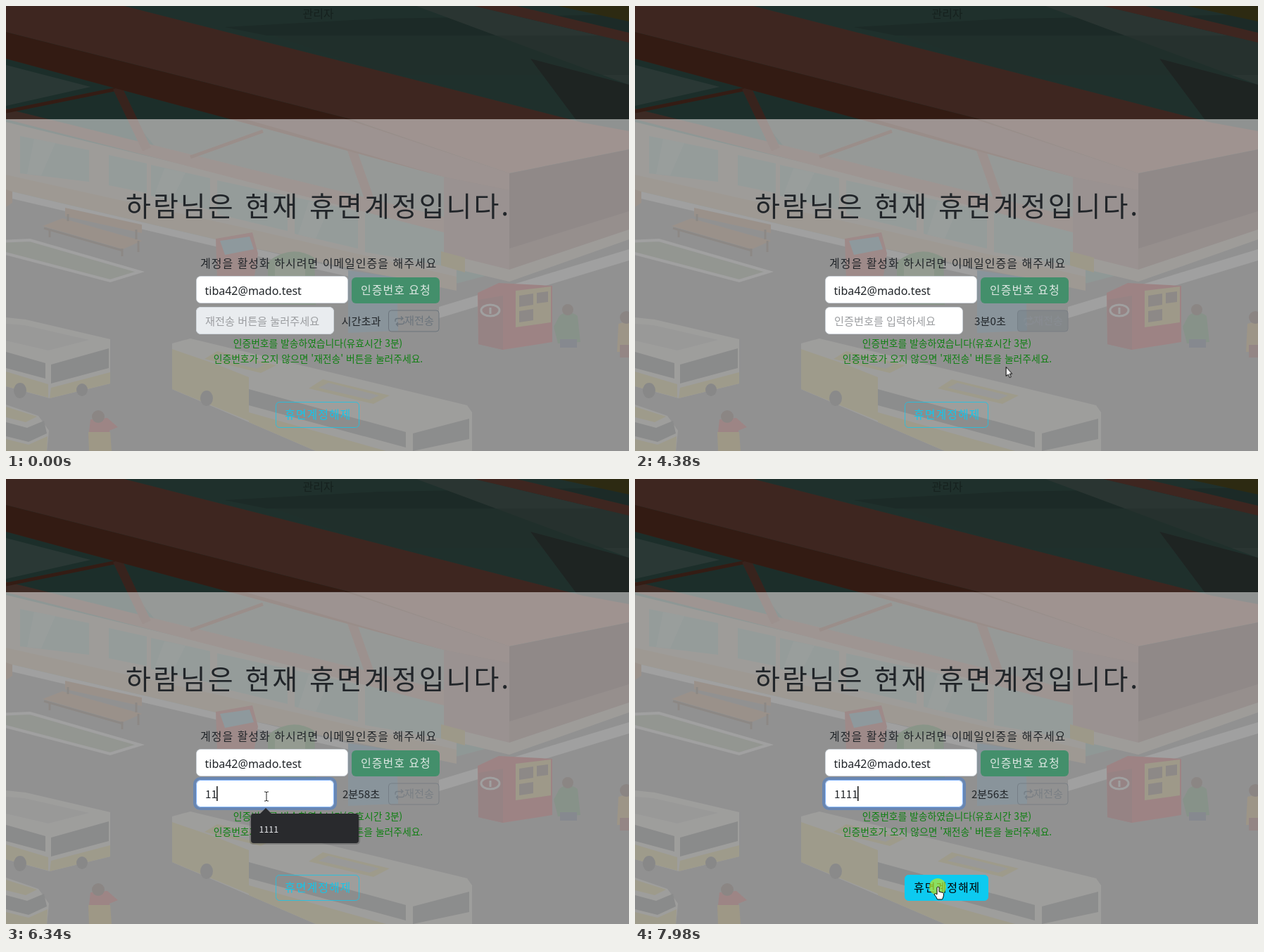
Animation of 885 by 633 pixels, one loop 8 s. Source, as an HTML page:

```html
<!DOCTYPE html>
<html lang="ko">
<head>
<meta charset="utf-8">
<title>휴면계정 해제</title>
<style>
html, body { margin: 0; width: 100%; height: 100%; overflow: hidden; background: #232323; }
svg { display: block; width: 885px; height: 633px; }
text { font-family: "Noto Sans CJK KR", "Noto Sans CJK", "Noto Sans", sans-serif; font-size: 16px; fill: #212529; }
.spaced { letter-spacing: 1px; }
.title { font-size: 39px; font-weight: 300; letter-spacing: 3px; }
.field, .small { font-size: 15.2px; }
.hint { fill: #9b9da0; }
.note { font-size: 13.8px; fill: #0f7f12; }
.mid { text-anchor: middle; }
.email { font-family: "Noto Sans", sans-serif; }
.menu text { font-size: 12.4px; fill: #e8eaed; }

.pointer, .ring, .menu, .resend, .resend-fill, .resend-ink, .release, .release-ink {
  animation: 8s linear infinite;
}
.pointer { animation-name: travel; }
.ring { animation-name: focus; }
.menu { animation-name: menu; }
.resend { animation-name: disable; }
.resend-fill { animation-name: resend-fill; }
.resend-ink { animation-name: resend-ink; }
.release { animation-name: release; }
.release-ink { animation-name: release-ink; }

@keyframes travel {
  0%, 9% { transform: translate(751px, 617px); }
  11.5% { transform: translate(688px, 572px); }
  13.75% { transform: translate(632px, 516px); }
  15.875% { transform: translate(603px, 481px); }
  18.5% { transform: translate(578px, 451px); }
  19.4%, 51.375% { transform: translate(577px, 445px); }
  53% { transform: translate(548px, 490px); }
  54.75% { transform: translate(527px, 513px); }
  56.25% { transform: translate(480px, 500px); }
  58% { transform: translate(400px, 462px); }
  60%, 87.875% { transform: translate(370px, 451px); }
  90% { transform: translate(385px, 510px); }
  92.5% { transform: translate(418px, 562px); }
  94.75%, 100% { transform: translate(430px, 580px); }
}
@keyframes focus { 0%, 64.5% { opacity: 0; } 66.5%, 100% { opacity: 1; } }
@keyframes menu { 0%, 65% { opacity: 0; } 67.5%, 83.4% { opacity: 1; } 84.25% { opacity: .8; } 87%, 100% { opacity: 0; } }
@keyframes disable { 0%, 53% { opacity: 1; } 53.01%, 100% { opacity: .65; } }
@keyframes resend-fill { 0%, 19.3% { fill-opacity: 0; } 21.1%, 53.8% { fill-opacity: 1; } 55.7%, 100% { fill-opacity: 0; } }
@keyframes resend-ink { 0%, 19.3% { color: #6c757d; } 21.1%, 53.8% { color: #fff; } 54.7% { color: #868c94; } 55.7%, 100% { color: #6c757d; } }
@keyframes release { 0%, 92.8% { fill-opacity: 0; stroke-opacity: .75; } 94.75%, 100% { fill-opacity: 1; stroke-opacity: 1; } }
@keyframes release-ink { 0%, 92.8% { fill: #14c6eb; } 94.75%, 100% { fill: #000; } }
</style>
</head>
<body>
<svg viewBox="0 0 885 633">
  <!-- bus terminal -->
  <rect width="885" height="633" fill="#8c8c8c"/>
  <path fill="#7cc0b0" d="M0 0H885V330L620 400L0 270Z"/>
  <path fill="#70a89a" d="M310 30L530 18L885 12V42H370Z"/>
  <path fill="#a8d4c8" d="M583 0H665L885 52V112Z"/>
  <path fill="#86b8a8" d="M540 98H885V42H380Z" opacity=".5"/>
  <path fill="#788f88" d="M745 75L885 112V180L812 165Z"/>
  <path fill="#f89880" d="M665 0H725L885 38V52Z"/>
  <path fill="#b4a848" d="M784 0H885V22Z"/>

  <path fill="#f0e4cc" d="M0 150L640 300V400L0 262Z"/>
  <path fill="#a8e0d4" d="M20 185L118 205V250L20 238ZM146 212L200 224V266L146 255ZM206 226L290 245V290L206 270ZM300 248L400 270V320L300 296ZM410 272L500 292V345L410 324ZM510 292L622 315V370L510 350Z"/>
  <path fill="#c8f0e4" d="M40 189L70 195L50 241L30 239ZM225 231L255 237L235 277L210 271ZM430 278L460 284L440 331L415 325Z"/>
  <path fill="#f0cc98" d="M0 240L350 318L640 385V405L340 342L0 262Z"/>
  <path fill="#fff" d="M0 262L340 342L600 402V410L340 352L0 272Z"/>
  <path fill="#70b8a8" d="M0 75L290 150L622 235V315L0 165Z"/>
  <path fill="#a8e0d4" d="M0 84L120 115L0 142Z"/>
  <path fill="#b4ccbc" d="M180 161H332L622 237V300L215 204Z"/>
  <path fill="#f0a890" d="M0 146L622 300V322L0 161Z"/>
  <path fill="none" stroke="#d07050" stroke-width="5" d="M0 150L158 118M262 215L365 178"/>
  <path fill="none" stroke="#e08c74" stroke-width="13" d="M158 116L200 204M488 195L516 274"/>
  <path fill="#f89880" d="M0 0H168L820 166L885 178V204L715 238L490 161L0 37Z"/>
  <path fill="#cc6c4c" d="M0 37L490 161L715 238V264L622 243L0 75Z"/>
  <path fill="#e89c8c" d="M480 160L715 238V262L622 243L400 178L340 161Z"/>
  <path fill="#d09488" d="M622 243L715 262V392L622 368Z"/>
  <path fill="#804c44" d="M715 238L885 204V325L715 384Z"/>
  <path fill="#b0786c" d="M715 345L885 292V325L715 384Z"/>
  <path fill="#f0e4cc" d="M622 352L715 375L885 318V332L715 392L622 370Z"/>
  <path fill="#fff" d="M885 346V362L615 444V428Z"/>

  <!-- planter, bench -->
  <path fill="#9cb08c" stroke="#fff" stroke-width="4" d="M-8 335L34 333L190 378L148 391L-8 350Z"/>
  <path fill="#d08c50" d="M84 287L193 311V323L84 299ZM52 313L80 302L193 334L166 346Z"/>
  <path fill="none" stroke="#604028" stroke-width="3" d="M62 317V329M165 345V356M188 334V350M88 296V306M185 318V332M54 316L166 348"/>
  <path fill="#d08c50" d="M0 261L9 264V280L0 286Z"/>

  <!-- kiosks -->
  <path fill="#f05048" d="M298 331L350 322L358 352L352 390H300Z"/>
  <path fill="#70c8e8" d="M304 334L346 328L352 346L311 354Z"/>
  <path fill="#48a840" d="M372 364Q405 338 438 358L440 425L372 424Z"/>
  <path fill="#a0d888" d="M382 368L425 362V390H382Z"/>
  <path fill="#48a0d8" d="M486 376L555 386L557 462L486 465Z"/>
  <path fill="#e8c848" d="M618 349L652 358V379L618 369Z"/>
  <path fill="#e81c24" d="M670 408L700 394L776 398V478L706 489L671 481Z"/>
  <path fill="#b01820" d="M671 418L706 412V489L671 481Z"/>
  <path fill="#f0c848" d="M724 405L774 399V450L724 457Z"/>
  <path fill="#684838" d="M729 412L749 409V425L729 428ZM754 408L770 406V421L754 423ZM729 434L749 431V447L729 450Z"/>
  <ellipse cx="688" cy="433" rx="13" ry="8" fill="none" stroke="#fff" stroke-width="3"/>
  <path stroke="#fff" stroke-width="3" d="M688 429V438"/>

  <!-- people -->
  <path fill="#389048" d="M786 441Q798 430 812 441L816 478L784 480L778 456Z"/>
  <path fill="#304878" d="M787 474H811V486H787Z"/>
  <circle cx="798" cy="432" r="8" fill="#583020"/>
  <path fill="#e8a838" d="M870 452L885 448V492H868Z"/>
  <path fill="#a03028" d="M872 482H885V500H872Z"/>
  <circle cx="881" cy="443" r="9" fill="#582818"/>
  <path fill="#e82828" d="M120 588L144 586L159 599L147 604L148 615H117Z"/>
  <path fill="#f0c430" d="M117 606H148L150 633H118Z"/>
  <circle cx="131" cy="584" r="9" fill="#583020"/>

  <!-- buses -->
  <path fill="#f4f0e4" d="M0 443L28 446L148 474V537L62 558L0 541Z"/>
  <path fill="#c8c8c4" d="M0 452L26 454L118 475L60 490L0 476Z"/>
  <path fill="#505858" d="M0 492L56 508V530L0 515ZM64 510L146 487V515L64 537Z"/>
  <path fill="#f0d858" d="M0 520L60 538V557L0 541ZM64 543L148 521V537L62 558Z"/>
  <ellipse cx="20" cy="547" rx="9" ry="11" fill="#404040"/>
  <ellipse cx="108" cy="546" rx="8" ry="9" fill="#404040"/>

  <path fill="#f4f0e4" d="M236 480L262 473L655 568L662 578V633H440L236 545Z"/>
  <path fill="#f0d858" d="M236 488L300 510L345 528V590L236 545Z"/>
  <path fill="#f0d858" d="M300 491L384 511L362 522L282 502ZM450 531L545 554L522 566L430 544Z"/>
  <path fill="#c8c8c4" d="M306 495L368 510L356 516L294 501ZM458 536L530 554L516 560L444 543Z"/>
  <path fill="#606868" d="M345 545L568 606V628L345 568ZM578 608L658 587V616L578 633Z"/>
  <path fill="#f0d858" d="M345 578L540 633H440L345 592Z"/>
  <ellipse cx="285" cy="558" rx="9" ry="11" fill="#505050"/>

  <path fill="#f4f0e4" d="M0 567L46 583L61 604L58 633H0Z"/>
  <path fill="#505858" d="M0 592L30 600L54 590L58 608L32 620L0 612Z"/>
  <path fill="#f0d858" d="M0 570L44 584L28 592L0 585ZM0 616L32 624L59 612L58 633H0Z"/>

  <rect width="885" height="633" opacity=".75"/>
  <text class="mid" x="443.5" y="17" style="fill:#16211e">관리자</text>
  <rect y="161" width="885" height="472" fill="#fff" opacity=".5"/>

  <!-- form -->
  <text class="title" x="170" y="299">하람님은 현재 휴면계정입니다.</text>
  <text class="spaced" x="276" y="372">계정을 활성화 하시려면 이메일인증을 해주세요</text>
  <rect x="270.5" y="384.5" width="215" height="38" rx="6" fill="#fff" stroke="#ced4da"/>
  <text class="email" x="282.5" y="411">tiba42@mado.test</text>
  <rect x="491" y="386" width="125" height="37" rx="6" fill="#438f6b"/>
  <text class="spaced" x="504" y="410" style="fill:#dce7e2">인증번호 요청</text>

  <g class="ring">
    <rect x="268" y="426" width="200" height="43" rx="8" fill="none" stroke="#0d6efd" stroke-opacity=".3" stroke-width="4"/>
  </g>
  <rect x="270.5" y="428.5" width="195" height="38" rx="6" fill="#fff" stroke="#ced4da"/>
  <rect data-on="0-2440" x="270.5" y="428.5" width="195" height="38" rx="6" fill="#e9ecef" stroke="#ced4da"/>
  <rect class="ring" x="270.5" y="428.5" width="195" height="38" rx="6" fill="none" stroke="#86b7fe"/>
  <text class="field hint" data-on="0-2440" x="283" y="453.5">재전송 버튼을 눌러주세요</text>
  <text class="field hint" data-on="2440-6200" x="283" y="453.5">인증번호를 입력하세요</text>
  <text class="field" id="code" x="283" y="454"></text>
  <path id="caret" data-on="5270-5800,6200-7330,7850-8000" stroke="#000" stroke-width="1.4" d="M0 437V458"/>

  <text class="small mid" id="timer" x="504.5" y="453.5"></text>
  <g class="resend">
    <rect class="resend-fill" x="543.5" y="433" width="71.5" height="30" rx="4" fill="#6c757d" stroke="#6c757d"/>
    <g class="resend-ink">
      <path fill="none" stroke="currentColor" stroke-width="1.3" d="M553 449V447Q553 444.500 556 444.500H563M565.500 448V450Q565.500 452.500 562.500 452.500H555M561 441.500L564 444.500L561 447M557 450L554.500 452.500L557 455.500"/>
      <text class="small" x="566" y="452.500" style="fill:currentColor">재전송</text>
    </g>
  </g>

  <text class="note mid" x="443" y="485">인증번호를 발송하였습니다(유효시간 3분)</text>
  <text class="note mid" x="443.5" y="507">인증번호가 오지 않으면 '재전송' 버튼을 눌러주세요.</text>

  <rect class="release" x="383.5" y="563.5" width="118" height="36" rx="5" fill="#0dcaf0" stroke="#0dcaf0"/>
  <text class="spaced release-ink" x="396" y="587">휴면계정해제</text>

  <!-- autofill list -->
  <g class="menu">
    <rect id="shade" x="346" y="476" width="157" rx="5" opacity=".18"/>
    <path fill="#292a2d" d="M360 477L369 468L378 477Z"/>
    <rect id="panel" x="348" y="476" width="153" rx="4" fill="#292a2d"/>
    <text x="359.5" y="502.500">1111</text>
    <text data-on="0-6200" x="359.5" y="538">2222</text>
    <text data-on="0-6200" x="359.5" y="573">1268</text>
    <text data-on="6200-6340" x="359.5" y="538">1268</text>
    <text data-on="0-6200" x="359.5" y="608.500">8867</text>
  </g>

  <!-- mouse pointer -->
  <g class="pointer">
    <circle data-on="2370-2570,5130-5330,7960-8000" r="12" fill="#b4e632" opacity=".75"/>
    <path data-on="720-1520,4190-4600,7100-7400" fill="#fff" stroke="#000" d="M.5 .5V13.500L3.500 11L5.500 15.500L7.500 14.700L5.600 10.200H9Z"/>
    <path data-on="1520-4190,7400-8000" fill="#fff" stroke="#000" d="M-1 1Q.500 -1 2 1V7L7.500 8.500Q9 9 8.500 12Q8 15 6.500 18H-.500Q-2 14 -5 11Q-4.500 8.500 -1 11Z"/>
    <path data-on="4600-7100" fill="none" stroke="#222" d="M-3 -6H-1L0 -5L1 -6H3M0 -5V6M-3 7H-1L0 6L1 7H3"/>
  </g>
</svg>
<script>
const LOOP = 8000;
const keyTimes = [6200, 6340, 6480, 6620];
const ticks = [3580, 4600, 5600, 6600, 7580];
const byId = id => document.getElementById(id);
const code = byId("code"), caret = byId("caret"), timer = byId("timer");

const timed = [...document.querySelectorAll("[data-on]")].map(el => ({
  el,
  spans: el.dataset.on.split(",").map(span => span.split("-").map(Number))
}));

const passed = (times, t) => times.filter(time => t >= time).length;

function remaining(t) {
  const n = passed(ticks, t);
  if (!n) return "시간초과";
  return n === 1 ? "3분0초" : `2분${61 - n}초`;
}

function draw(t) {
  for (const { el, spans } of timed) {
    const on = spans.some(([from, to]) => t >= from && t < to);
    el.setAttribute("visibility", on ? "visible" : "hidden");
  }
  const typed = passed(keyTimes, t);
  code.textContent = "1".repeat(typed);
  caret.setAttribute("transform", `translate(${283 + typed * 8.45})`);
  timer.textContent = remaining(t);
  const height = [170, 78, 42][Math.min(typed, 2)];
  byId("panel").setAttribute("height", height);
  byId("shade").setAttribute("height", height + 2);
}

let start;
function frame(now) {
  start ??= now;
  draw((now - start) % LOOP);
  requestAnimationFrame(frame);
}
draw(0);
requestAnimationFrame(frame);
</script>
</body>
</html>
```
